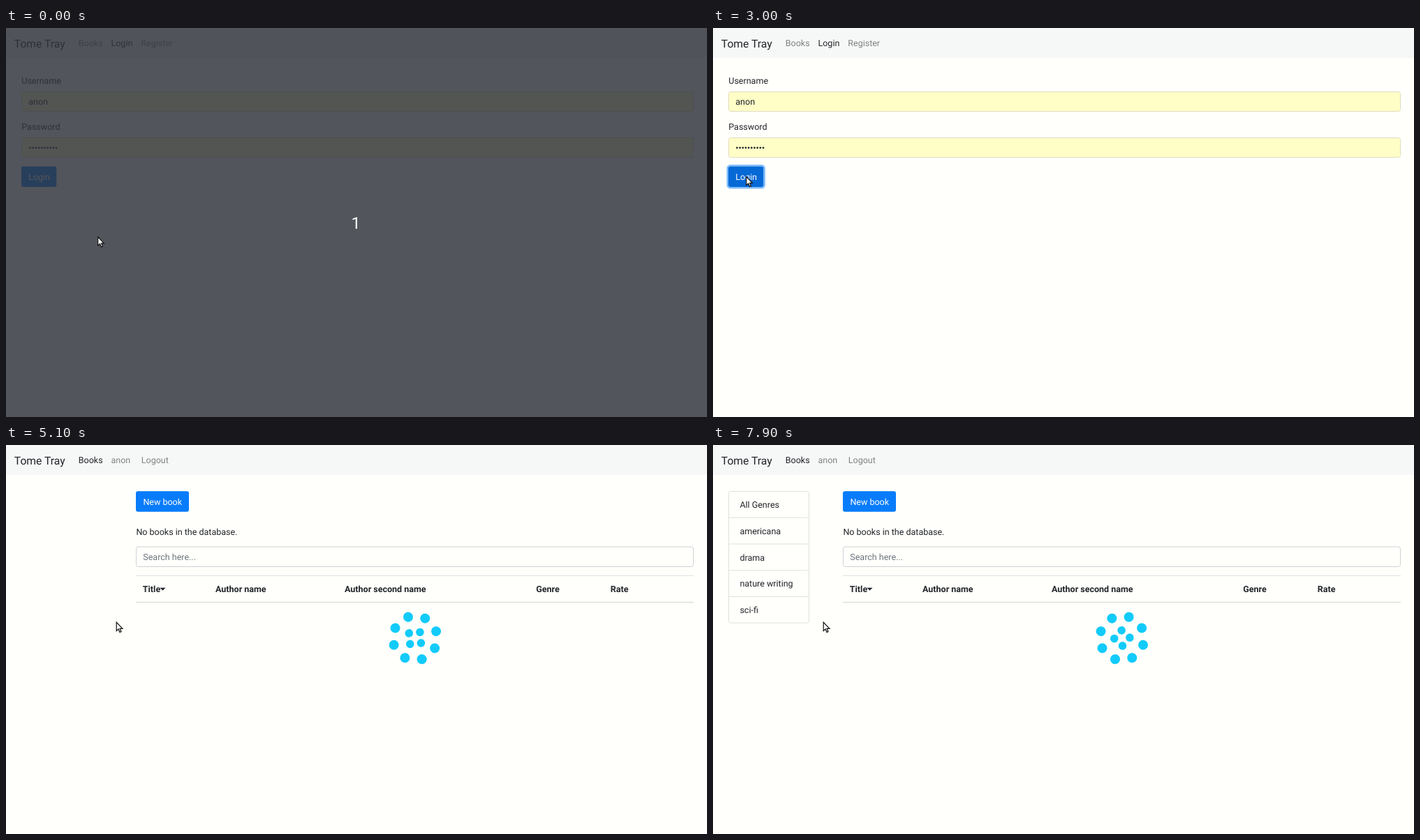
Animation of 1004x558 px, one loop 8000 ms. Source, as an HTML page:

```html
<!DOCTYPE html>
<html lang="en">
<head>
<meta charset="utf-8">
<title>Book list login</title>
<style>
  html, body { margin: 0; width: 100%; height: 100%; overflow: hidden; background: #fffffb; }
  svg { display: block; width: 1004px; height: 558px; }
  text { font: 12.5px Roboto, sans-serif; fill: #212529; text-rendering: geometricPrecision; white-space: pre; }
  .brand { font-size: 15.7px; }
  .muted { fill: #808282; }
  .hint { fill: #6c757d; }
  .white { fill: #fff; }
  .bold text { font-weight: 700; }
  .count { font-size: 23.5px; text-anchor: middle; }
  .field { fill: #fffec6; stroke: #dfdcc0; }
  .box { fill: none; stroke: #ced3d6; }
  .list { fill: none; stroke: #dfdfdc; }
  .line { fill: #dee1e2; }
  .button { fill: #087cfb; }
  #spinner { fill: #12cbfb; }
</style>
</head>
<body>
<svg viewBox="0 0 1004 558">
  <rect width="1004" height="558" fill="#fffffb"/>
  <rect width="1004" height="43" fill="#f6f8f7"/>

  <text id="brand" class="brand" x="11.8" y="27.6">Tome Tray</text>

  <g id="login">
    <text class="muted" x="103.8" y="26.3">Books</text>
    <text x="150.5" y="26.3">Login</text>
    <text class="muted" x="193.3" y="26.3">Register</text>
    <text x="22.3" y="80">Username</text>
    <rect class="field" x="22.5" y="91.5" width="962" height="28" rx="3"/>
    <text x="32.3" y="110">anon</text>
    <text x="22.3" y="146.3">Password</text>
    <rect class="field" x="22.5" y="157.5" width="962" height="28" rx="3"/>
    <g id="dots" fill="#212529"></g>
    <rect id="ring" x="20.8" y="197.2" width="52.8" height="32" rx="4" fill="none" stroke="#80bdfd" stroke-width="2.6"/>
    <rect id="submit" x="22" y="198.5" width="50.3" height="29.5" rx="3"/>
    <text class="white" x="32.2" y="217.7">Login</text>
  </g>

  <g id="books">
    <text x="103.8" y="26.3">Books</text>
    <text class="muted" x="150.5" y="26.3">anon</text>
    <text class="muted" x="193.8" y="26.3">Logout</text>
    <rect class="button" x="186" y="66.3" width="76" height="29.5" rx="3"/>
    <text class="white" x="196.4" y="85.5">New book</text>
    <text x="186.4" y="128.8">No books in the database.</text>
    <rect class="box" x="186.5" y="146" width="798" height="28.5" rx="3"/>
    <text class="hint" x="196.3" y="164.7">Search here...</text>
    <rect class="line" x="186" y="187" width="799" height="1"/>
    <g class="bold">
      <text x="195.8" y="211">Title</text>
      <text x="300" y="211">Author name</text>
      <text x="485" y="211">Author second name</text>
      <text x="759.3" y="211">Genre</text>
      <text x="865.8" y="211">Rate</text>
    </g>
    <path d="M220.5 204.8h8l-4 4z" fill="#212529"/>
    <rect class="line" x="186" y="224.8" width="799" height="1.6"/>
    <g id="spinner" transform="translate(585.8 277)">
      <g id="outer"></g>
      <g id="inner"></g>
    </g>
    <g id="genres">
      <rect class="list" x="22.5" y="66.5" width="115" height="188.7" rx="3"/>
    </g>
  </g>

  <g id="countdown">
    <rect width="1004" height="558" fill="#2f333c" fill-opacity=".83"/>
    <text class="count white" x="501" y="287.5">1</text>
  </g>

  <path id="cursor" d="M.7 .8V13.2L3.5 10.6 5.5 15.1 7.5 14.2 5.6 9.8H9.4Z" fill="#fff" stroke="#111" stroke-width="1.2"/>
</svg>
<script>
const LOOP = 8000, STEP = 100;
const $ = id => document.getElementById(id);

function add(parent, tag, attrs, label = '') {
  const node = document.createElementNS('http://www.w3.org/2000/svg', tag);
  for (const key in attrs) node.setAttribute(key, attrs[key]);
  node.textContent = label;
  parent.append(node);
}

function addCircleOfDots(parent, count, distance, r) {
  for (let i = 0; i < count; i++) {
    const a = i / count * 2 * Math.PI;
    add(parent, 'circle', { cx: distance * Math.cos(a), cy: distance * Math.sin(a), r });
  }
}

addCircleOfDots($('outer'), 8, 31.8, 7);
addCircleOfDots($('inner'), 4, 11.1, 5.8);
for (let i = 0; i < 10; i++) add($('dots'), 'circle', { cx: 34.4 + i * 4.17, cy: 171.8, r: 1.4 });

['All Genres', 'americana', 'drama', 'nature writing', 'sci-fi'].forEach((name, i) => {
  const y = 66.5 + i * 37.75;
  add($('genres'), 'text', { x: 38.4, y: y + 23.6 }, name);
  if (i) add($('genres'), 'path', { class: 'list', d: `M22.5 ${y}H137.5` });
});

const clamp = x => Math.min(1, Math.max(0, x));
const ease = x => x * x * (3 - 2 * x);
const show = (id, on) => $(id).style.display = on ? '' : 'none';
const turn = (id, angle) => $(id).setAttribute('transform', `rotate(${angle})`);

function cursorAt(t) {
  if (t < 300) return [131, 299];
  const toButton = ease(clamp((t - 300) / 300));
  const toList = ease(clamp((t - 4400) / 600));
  return [122 - 75 * toButton + 110.5 * toList, 290.5 - 78 * toButton + 41 * toList];
}

function buttonColor(t) {
  if (t < 600) return '#087cfb';
  return t >= 1000 && t < 1500 ? '#0463cb' : '#0669d6';
}

function draw(t) {
  show('countdown', t < 300);
  show('login', t < 3100);
  show('brand', t < 3100 || t >= 3400);
  show('books', t >= 3400);
  show('genres', t >= 5400);
  $('submit').setAttribute('fill', buttonColor(t));
  $('ring').setAttribute('opacity', clamp((t - 900) / 300));
  $('cursor').setAttribute('transform', `translate(${cursorAt(t)})`);
  const spin = Math.max(0, t - 3500) / 1000;
  turn('outer', 45 * spin);
  turn('inner', -144 * spin);
}

const start = performance.now();
function tick() {
  const t = (performance.now() - start) % LOOP;
  draw(Math.floor(t / STEP) * STEP);
  requestAnimationFrame(tick);
}
tick();
</script>
</body>
</html>
```
